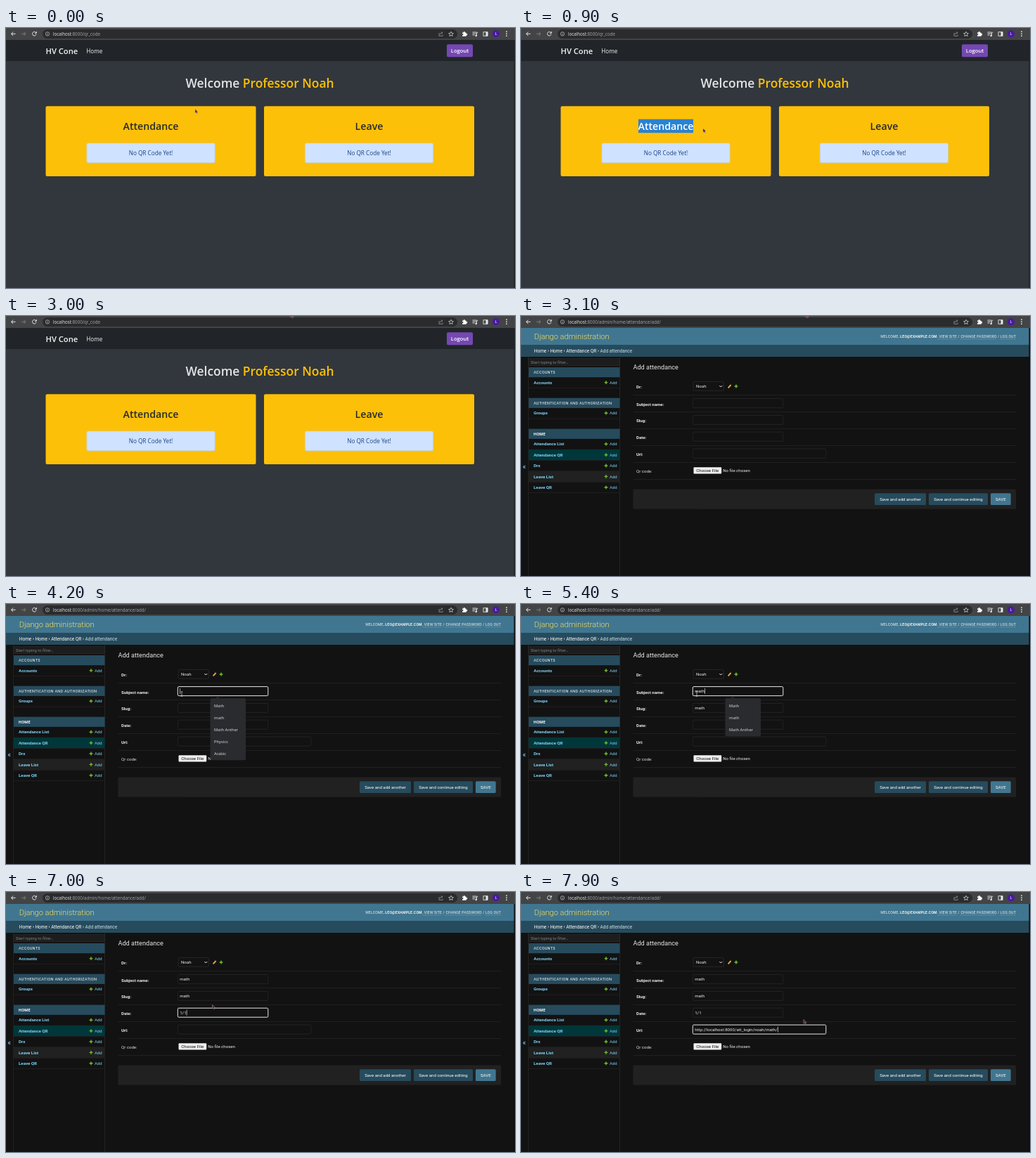
An HTML page that plays this animation: 724x370 px, repeating every 8 s.

```html
<!DOCTYPE html>
<html lang="en">
<head>
<meta charset="utf-8">
<title>Attendance admin</title>
<style>
html, body { margin: 0; width: 100%; height: 100%; overflow: hidden; background: #121212; }
svg { display: block; width: 100vw; height: 100vh; }
text { font-family: Roboto, "Liberation Sans", sans-serif; white-space: pre; }
.os { font-family: "Open Sans", "Noto Sans", sans-serif; }
</style>
</head>
<body>
<svg id="stage" viewBox="0 0 724 370"></svg>
<script>
const LOOP = 8000, PAGE_SWITCH = 3100;
const LINK = '#81d4fa', TEAL = '#264b5d', BLUE = '#417690', GREEN = '#70bf2b';

const rect = (x, y, w, h, fill, extra = '') =>
  `<rect x="${x}" y="${y}" width="${w}" height="${h}" fill="${fill}" ${extra}/>`;
const text = (x, y, size, fill, str, extra = '') =>
  `<text x="${x}" y="${y}" font-size="${size}" fill="${fill}" ${extra}>${str}</text>`;
const path = (d, stroke, width = 1, fill = 'none') =>
  `<path d="${d}" stroke="${stroke}" stroke-width="${width}" fill="${fill}"/>`;
const OS = 'class="os"', MID = 'text-anchor="middle"', BOLD = 'font-weight="700"', SEMI = 'font-weight="600"';
const plus = (x, y) => path(`M${x - 2.4} ${y}h4.8M${x} ${y - 2.4}v4.8`, GREEN, 1.4);

function browserBar() {
  const ink = '#e4e6e8', dim = '#a4a7aa';
  return rect(0, 0, 724, 17, '#434446') + rect(52, 2, 590, 13, '#2a2b2d', 'rx="6.5"') +
    path('M13.5 8.3h-6M10.3 5.5L7.5 8.3l2.8 2.8', ink) +
    path('M22 8.3h6M25.2 5.5L28 8.3l-2.8 2.8', '#7b7d80') +
    path('M42.6 6.6a2.8 2.8 0 1 0 .4 2.4M43.3 5v2.3h-2.4', ink) +
    '<circle cx="59" cy="8.4" r="2.7" fill="none" stroke="#c8cacc" stroke-width=".7"/>' +
    path('M59 8v2M59 6.7v.7', '#c8cacc', .7) +
    path('M616 7v4.3h5V9.5M617.3 9.3q.3-2.6 3.5-2.6M619.5 5.3l1.5 1.4-1.5 1.5', dim, .7) +
    path('M633 5.2l1 2.2 2.4.2-1.8 1.6.5 2.4-2.1-1.3-2.1 1.3.5-2.4-1.8-1.6 2.4-.2z', ink, .7) +
    path('M649 6.5h1.8a1.1 1.1 0 1 1 2 0h1.8v1.7a1.1 1.1 0 1 1 0 2v1.6H649V10a1 1 0 1 0 0-1.8z', 'none', 0, '#fff') +
    path('M663.5 6h5.5M663.5 8h5.5M663.5 10h3M669.5 11V6.3h1.7', ink, .9) +
    '<circle cx="668.6" cy="11" r="1.2" fill="#e4e6e8"/>' +
    path('M679 5.7h6v5.6h-6z', ink, .9) + rect(682.5, 5.5, 2.8, 6, ink) +
    '<circle cx="697" cy="8.3" r="5" fill="#4b18a6"/>' + text(697, 10.4, 5.6, '#fff', 'L', MID) +
    [5.2, 8.2, 11.2].map(y => `<circle cx="712" cy="${y}" r=".9" fill="#e4e6e8"/>`).join('');
}

const address = rest => text(67, 10.7, 6.2, '#e8eaed',
  `localhost<tspan fill="#a5a8ac">:8000${rest}</tspan>`, OS);

function card(x, title) {
  const mid = x + 149.5;
  return rect(x, 111.3, 299, 99.7, '#fdc008', 'rx="2"') +
    text(mid, 145.4, 14.2, '#272a2c', title, `${OS} ${SEMI} ${MID}`) +
    rect(x + 58.4, 163.9, 182.2, 27.9, '#cfe2ff', 'rx="2" stroke="#b6d0f4" stroke-width=".6"') +
    text(mid, 180.9, 8.2, '#1a4188', 'No QR Code Yet!', `${OS} ${MID}`);
}

function welcomePage() {
  return rect(0, 17, 724, 353, '#32373d') + rect(0, 17, 724, 30, '#212529') +
    address('/qr_code') +
    text(56.5, 37, 11.2, '#f4f5f5', 'HV Cone', `${OS} ${SEMI}`) +
    text(114.3, 35.6, 8.1, '#f4f5f5', 'Home', OS) +
    rect(627, 23.3, 37, 17.9, '#7548b2', 'rx="2"') +
    text(645.5, 35.3, 7.6, '#fff', 'Logout', `${OS} ${SEMI} ${MID}`) +
    text(361, 84.8, 17.4, '#e3e4e6', 'Welcome <tspan fill="#fdc008">Professor Noah</tspan>', `${OS} ${SEMI} ${MID}`) +
    card(56.5, 'Attendance') + card(367, 'Leave') +
    '<clipPath id="clip"><rect id="sel" x="167" y="129.5" width="0" height="20"/></clipPath><g clip-path="url(#clip)">' +
    rect(167, 129.5, 78, 20, '#2a82d2') +
    text(206, 145.4, 14.2, '#fff', 'Attendance', `${OS} ${SEMI} ${MID}`) + '</g>' +
    rect(722.5, 17, 1.5, 353, '#202326');
}

function sidebar() {
  const section = (y, name, extra) => rect(11, y, 129.5, 14.2, TEAL) +
    text(18, y + 9, 5.5, '#fff', name, `letter-spacing=".31" ${extra}`);
  const model = (y, name, bg) => (bg ? rect(11, y - 7.5, 129.5, 15, bg) : '') +
    rect(11, y + 7.6, 129.5, .5, '#2b2b2b') +
    text(18, y + 2.2, 6.15, LINK, name, BOLD) + plus(121, y) + text(126, y + 2.2, 5.9, LINK, 'Add');
  return rect(10.4, 58, .5, 312, '#303030') + rect(140.4, 58, .6, 312, '#303030') +
    text(2.3, 218.4, 10, LINK, '«') +
    rect(11, 60.6, 129.3, 10, '#1d1d1d', 'stroke="#303030" stroke-width=".5"') +
    text(13.7, 67.8, 5.9, '#828282', 'Start typing to filter…') +
    section(73, 'ACCOUNTS', '') + model(94.6, 'Accounts') +
    section(116.7, 'AUTHENTICATION AND AUTHORIZATION', '') + model(138.2, 'Groups') +
    section(160.6, 'HOME', BOLD) + model(182.2, 'Attendance List') +
    model(197.6, 'Attendance QR', '#00373a') + model(213, 'Drs') +
    model(228.4, 'Leave List', '#212121') + model(243.8, 'Leave QR');
}

const fields = {
  subject: { y: 117.6, w: 128.5, past: ['Math', 'math', 'Math Anther', 'Physics', 'Arabic'] },
  slug: { y: 141.4, w: 128.5 },
  date: { y: 165.2, w: 128.5, past: ['1/2/2022', '5 September 2022', '1/25/2022', '2/1/2022', '10/10/2022', '3/4/2022'] },
  url: { y: 189.1, w: 189.5, past: ['noah/', 'lina/', 'math/', 'art/', '', 'noah/art/'].map(s => 'http://localhost:8000/att_login/' + s) }
};

function adminPage() {
  const button = (x, w, fill, str) => rect(x, 252.3, w, 16.7, fill, 'rx="1.5"') +
    text(x + w / 2, 262.7, 6.1, '#fff', str, MID);
  const rows = [['Dr:', 102.6], ['Subject name:', 127.5], ['Slug:', 151.2], ['Date:', 175.2], ['Url:', 199]];
  return rect(0, 17, 724, 353, '#121212') + rect(0, 17, 724, 24, BLUE) + rect(0, 41, 724, 17, TEAL) +
    address('/admin/home/attendance/add/') +
    text(18.7, 33, 11.1, '#f5dd5d', 'Django administration', 'font-weight="300"') +
    text(704, 31.2, 5.1, '#f3f6f7',
      'WELCOME, <tspan font-weight="700">LEO@EXAMPLE.COM</tspan>. VIEW SITE / CHANGE PASSWORD / LOG OUT',
      'letter-spacing=".2" text-anchor="end"') +
    path('M592 32.8h27M624 32.8h52M681 32.8h23', '#7fa3b5', .5) +
    text(18.8, 52, 6.5, '#fff', 'Home › Home › Attendance QR › <tspan fill="#c9dfea">Add attendance</tspan>') +
    sidebar() +
    text(159.4, 76.3, 9.2, '#e4e4e4', 'Add attendance') +
    rows.map(([name, y]) => text(164, y, 6.1, '#eee', name, BOLD)).join('') +
    text(164, 223, 6.1, '#ddd', 'Qr code:') +
    [112.5, 136.5, 160.4, 184.4, 208.4, 232.3].map(y => rect(159.5, y, 544.5, .5, '#2e2e2e')).join('') +
    rect(245, 93.4, 43.5, 12.8, '#121212', 'rx="1.5" stroke="#353535" stroke-width=".6"') +
    text(249, 102, 6.1, '#eee', 'Noah') + path('M282.3 99l2 2 2-2', '#fff', .9) +
    path('M294.6 102.4l4-4.4', '#e0a53c', 1.9) + plus(306, 100) +
    rect(245.5, 215.2, 39.7, 9.2, '#efefef', 'rx="1"') +
    text(265.3, 222.1, 6.15, '#111', 'Choose File', MID) + text(287.2, 222.1, 6.1, '#eee', 'No file chosen') +
    rect(159.5, 246.6, 544.5, 28.2, '#212121', 'rx="1.5"') +
    button(503, 73, TEAL, 'Save and add another') + button(580, 84, TEAL, 'Save and continue editing') +
    button(668, 28.7, BLUE, 'SAVE') +
    Object.entries(fields).map(([id, f]) =>
      rect(244.3, f.y, f.w, 13, '#121212', `id="${id}Box" rx="1.5"`) +
      text(247.2, f.y + 8.4, 6.1, '#eee', '', `id="${id}"`)).join('') +
    rect(0, 0, .6, 8, '#fff', 'id="caret"') + '<g id="popup"></g>' +
    rect(722.5, 17, 1.5, 353, '#0d0d0d');
}

// [time, focused field, its text]
const edits = [
  [4100, 'subject', ''], [4400, 'subject', 'm'], [4500, 'subject', 'ma'], [4600, 'subject', 'mat'], [4700, 'subject', 'math'],
  [5500, null],
  [5800, 'date', ''], [6500, 'date', '1'], [6700, 'date', '1/'], [6800, 'date', '1/1'],
  [7200, 'url', ''], [7600, 'url', 'http'], [7800, 'url', 'http://localhost:80'],
  [7900, 'url', 'http://localhost:8000/att_login/noah/math/']
];

// [time, x, y] of the pointer tip
const route = [
  [0, 269, 115.5], [400, 167, 141], [800, 259, 143], [1000, 259, 143], [1300, 250, 180], [1800, 422, 150],
  [2200, 499, 145], [2500, 400, 150], [2700, 402, 60], [3000, 405, -3.5], [3200, 405, -3.5],
  [3600, 330, 78], [4000, 250, 128], [5400, 250, 128], [5700, 252, 173], [6900, 252, 173],
  [7000, 293.5, 160.5], [7200, 300, 194], [7600, 300, 194], [7900, 402, 181.5], [8000, 402, 181.5]
];

function pointerAt(t) {
  const i = route.findIndex(p => p[0] > t);
  const [a, b] = [route[i - 1], route[i]];
  const k = (t - a[0]) / (b[0] - a[0]), e = k * k * (3 - 2 * k);
  return [a[1] + (b[1] - a[1]) * e, a[2] + (b[2] - a[2]) * e];
}

const stage = document.getElementById('stage');
stage.innerHTML = `<g id="welcome">${browserBar()}${welcomePage()}</g><g id="admin">${browserBar()}${adminPage()}</g>` +
  `<g id="pointer">${path('M0 0v5.4l1.3-1 1 1.9 1-.5-.9-1.8h1.6z', '#c69aa4', .5, '#35203c')}</g>` +
  `<g id="beam">${path('M-1.3-3.2h2.6M0-3.2v6.4M-1.3 3.2h2.6', '#ddd', .7)}</g>`;
const $ = id => document.getElementById(id);
const show = (id, on) => $(id).setAttribute('display', on ? 'inline' : 'none');

function popup(field, typed) {
  const items = field.past.filter(s => s.toLowerCase().startsWith(typed.toLowerCase()));
  if (!items.length) return '';
  const top = field.y + 16.6;
  const width = 12 + 3.5 * Math.max(...items.map(s => s.length));
  return path(`M298 ${top}l3-2.8 3 2.8z`, 'none', 0, '#2a2b2e') +
    rect(290.5, top, width, items.length * 17 + 3, '#2a2b2e', 'rx="2"') +
    items.map((s, i) => text(296, top + 13 + 17 * i, 5.8, '#e2e3e5', s, OS)).join('');
}

function drawForm(t) {
  const values = { subject: '', slug: '', date: '', url: '' };
  let focus = null;
  for (const [time, id, value] of edits) {
    if (time > t) break;
    focus = id;
    if (id) values[id] = value;
  }
  values.slug = values.subject;
  for (const id in fields) {
    $(id).textContent = values[id];
    $(id + 'Box').setAttribute('stroke', id === focus ? '#e6e6e6' : '#303030');
    $(id + 'Box').setAttribute('stroke-width', id === focus ? 1 : .6);
  }
  show('caret', focus);
  $('popup').innerHTML = focus ? popup(fields[focus], values[focus]) : '';
  if (focus) {
    const end = values[focus] ? $(focus).getComputedTextLength() : 0;
    $('caret').setAttribute('x', 247.4 + end);
    $('caret').setAttribute('y', fields[focus].y + 2.4);
  }
}

function draw(now) {
  const t = Math.floor(now % LOOP / 100) * 100;
  const admin = t >= PAGE_SWITCH, [x, y] = pointerAt(t);
  const typing = t >= 4000 && t < 7000 || t >= 7200 && t < 7700;
  show('welcome', !admin);
  show('admin', admin);
  show('pointer', !typing);
  show('beam', typing);
  for (const id of ['pointer', 'beam']) $(id).setAttribute('transform', `translate(${x} ${y})`);
  if (admin) drawForm(t);
  else $('sel').setAttribute('width', t > 400 && t < 1000 ? Math.min(78, Math.max(0, x - 167)) : 0);
  requestAnimationFrame(draw);
}
requestAnimationFrame(draw);
</script>
</body>
</html>
```
